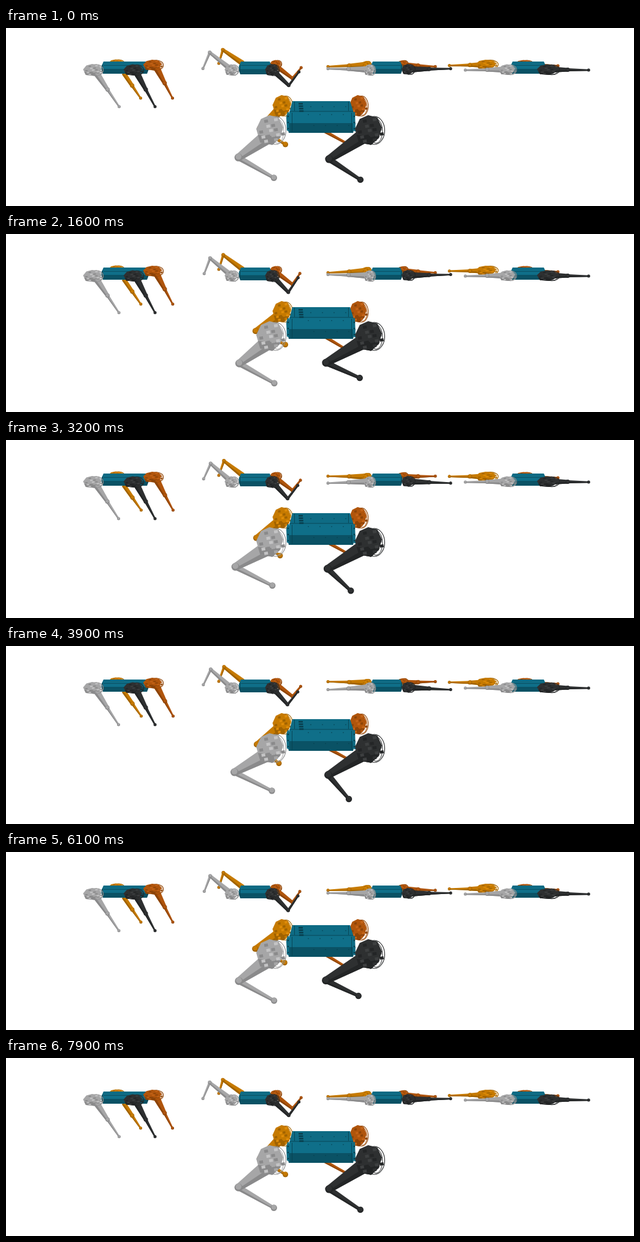
These frames come from a looping animation (1024 px wide and 292 px high, 8000 ms). An HTML page with a canvas:

```html
<!DOCTYPE html>
<html lang="en">
<head>
<meta charset="utf-8">
<title>Walking robots</title>
<style>
html, body { margin: 0; width: 100%; height: 100%; overflow: hidden; background: #fff; }
canvas { display: block; }
</style>
</head>
<body>
<canvas id="stage" width="1024" height="292"></canvas>
<script>
const ctx = document.getElementById('stage').getContext('2d');
const LOOP = 8000, STEP = 100, STRIDE = 4500;

// [shade, base, light]
const grey = ['#8a8a8b', '#a6a6a7', '#c4c4c5'];
const black = ['#232526', '#2e3031', '#3d3f40'];
const amber = ['#a06200', '#c67a00', '#e08c08'];
const rust = ['#8c4408', '#b0550c', '#c46418'];
const teal = { top: '#0e6b84', bright: '#0f6f89', low: '#0a5265', dark: '#083f4e' };

// All joints follow two waves: the quick stride and the slow sway
let stride = 0, sway = 0;
const moved = (x, y, [sx, sy], [wx, wy]) =>
  [x + sx * stride + wx * sway, y + sy * stride + wy * sway];

function polygon(color, ...points) {
  ctx.fillStyle = color;
  ctx.beginPath();
  for (const p of points) ctx.lineTo(...p);
  ctx.fill();
}

function disc(color, x, y, r) {
  ctx.fillStyle = color;
  ctx.beginPath();
  ctx.arc(x, y, r, 0, 7);
  ctx.fill();
}

function wire(color, width, x, y, rx, ry) {
  ctx.strokeStyle = color;
  ctx.lineWidth = width;
  ctx.beginPath();
  ctx.ellipse(x, y, rx, ry, 0, 0, 7);
  ctx.stroke();
}

// Tapered bar, darker along its lower edge
function bar(a, b, wa, wb, [shade, base]) {
  const dx = b[0] - a[0], dy = b[1] - a[1], length = Math.hypot(dx, dy);
  const flip = dx < 0 ? -1 : 1;
  const nx = -dy / length * flip, ny = dx / length * flip;
  const side = (p, w, k) => [p[0] + nx * w * k, p[1] + ny * w * k];
  const strip = (color, from, to) => polygon(color,
    side(a, wa, from), side(b, wb, from), side(b, wb, to), side(a, wa, to));
  strip(base, -.5, .5);
  strip(shade, .15, .5);
}

function ball([x, y], r, [shade, base]) {
  disc(shade, x, y, r);
  disc(base, x, y - r * .2, r * .75);
}

function bentLeg(hip, knee, end, [top, joint, ankle, tip], tone) {
  bar(knee, end, joint * .8, ankle, tone);
  ball(end, tip, tone);
  bar(hip, knee, top, joint, tone);
  ball(knee, joint / 2 + .5, tone);
}

function straightLeg(hip, end, tone, width = 11) {
  const knee = [0, 1].map(i => hip[i] + (end[i] - hip[i]) * .5);
  bentLeg(hip, knee, end, [width, 6, 2.4, 2.5], tone);
}

// Faceted motor housing in an open wire cage, covered with small plates
function motor(x, y, rx, ry, tone) {
  const [shade, base, light] = tone;
  const at = (u, v) => [x + u * rx, y + v * ry];
  wire(shade, 1.1, x + rx * .3, y, rx * .68, ry * .92);
  wire(base, 1, x + rx * .42, y + ry * .04, rx * .42, ry * .8);
  polygon(base, at(-.96, -.1), at(-.65, -.75), at(-.1, -1), at(.5, -.85),
    at(.8, -.2), at(.6, .5), at(.1, .95), at(-.7, .8));
  polygon(shade, at(-.85, .3), at(.65, .4), at(.1, .95), at(-.7, .8));
  for (let row = -2; row <= 2; row++) {
    for (let col = -2; col <= 2; col++) {
      const u = col * .32 + (row & 1) * .14, v = row * .33 - col * .05;
      if (Math.hypot(u, v) > .82) continue;
      polygon([light, shade, base][(row * 2 + col * 4 + 12) % 3],
        at(u - .13, v - .07), at(u + .11, v - .11), at(u + .14, v + .08), at(u - .1, v + .12));
    }
  }
}

function smallBody(left, right, top, bottom) {
  const at = k => top + (bottom - top) * k;
  const face = (color, from, to, insetA, insetB) => polygon(color,
    [left + insetA, at(from)], [right - insetA, at(from)], [right - insetB, at(to)], [left + insetB, at(to)]);
  face(teal.top, 0, .34, 4, 1);
  face(teal.bright, .3, .62, 1, 0);
  face(teal.low, .6, 1, 0, 3);
  ctx.fillStyle = teal.dark;
  for (const x of [left + 2, right - 3]) ctx.fillRect(x, at(.25), 1, (bottom - top) * .6);
  ctx.fillRect(left + 4, at(.3), right - left - 8, .6);
}

function standingRobot() {
  straightLeg([192, 74], [220 - sway * .5, 115], amber, 7);
  motor(180, 57, 13, 5.5, amber);
  smallBody(155, 233, 55, 75);
  straightLeg([246, 66], [272 - sway * .5, 115], rust);
  motor(240, 61, 17, 9, rust);
  straightLeg([147, 73], [184 + sway * .5, 129], grey);
  motor(142, 69, 17, 10, grey);
  straightLeg([213, 73], [243, 129], black);
  motor(208, 69, 17, 9.5, black);
}

function crouchingRobot() {
  const widths = [9, 5, 2.6, 2.5];
  bentLeg([386, 58], moved(354.5, 34.5, [0, -.5], [-1, .8]), [347, 58], widths, amber);
  bentLeg([436, 59], [467, 82.5], moved(480, 65.3, [-1, -.4], [.5, -.5]), widths, rust);
  motor(440, 59, 10, 6.5, rust);
  smallBody(379, 434, 55, 76);
  bentLeg([366, 67], moved(333, 39.2, [0, 0], [-.8, .9]),
    moved(322.3, 64.8, [1, -.3], [-.5, 1.5]), widths, grey);
  motor(368, 69, 12, 9.5, grey);
  bentLeg([436, 70], moved(460, 95.4, [0, .4], [1, -1]),
    moved(476.4, 73, [-.4, -.8], [1, -1.5]), widths, black);
  motor(434, 69, 12, 10, black);
}

function flatRobot() {
  const dip = 3.3 - 2.3 * sway - stride;
  straightLeg([594, 60], [525, 65 - dip], amber);
  straightLeg([644, 60], [700, 65 - dip], rust, 9);
  motor(588, 60, 8, 6, amber);
  motor(647, 58, 9, 5, rust);
  smallBody(594, 647, 55, 75);
  straightLeg([592, 68], [525, 65 + dip], grey);
  motor(593, 69, 10, 9.5, grey);
  straightLeg([655, 68], [725, 65 + dip], black);
  motor(656, 68, 11.5, 9, black);
}

function stretchedRobot() {
  straightLeg([846, 60], [900, 62], rust, 9);
  motor(845, 58, 15, 5.5, rust);
  straightLeg([790, 60], [723, 60.5 + sway], amber);
  motor(784, 60, 19, 8, amber);
  smallBody(822, 881, 55, 75);
  straightLeg([820, 68], [749, 69], grey);
  motor(818, 68.5, 15, 9, grey);
  straightLeg([882, 68], [950, 69], black);
  motor(884, 68.5, 19, 9, black);
}

function largeBody() {
  polygon(teal.top, [467, 120], [561, 120], [567, 139], [462, 139]);
  polygon(teal.bright, [462, 137], [566, 137], [569, 157], [458, 157]);
  polygon(teal.low, [458, 156], [570, 156], [566, 172], [461, 172]);
  for (const x of [458, 566]) {
    polygon(teal.top, [x + 1, 138], [x + 3, 138], [x + 4, 170], [x, 168], [x - 1, 146]);
    for (let y = 145; y < 168; y += 10) disc(teal.dark, x + 2, y, 1.3);
  }
  ctx.fillStyle = teal.dark;
  ctx.fillRect(463, 136.5, 103, .8);
  for (const x of [470, 558]) ctx.fillRect(x, 121, .8, 15);
  for (const x of [466, 563]) ctx.fillRect(x, 139, .8, 31);
  for (let y = 123; y < 136; y += 4) ctx.fillRect(477 + (y - 123) * .1, y, 7, 2.6);
  for (let x = 493; x < 555; x += 19) {
    disc(teal.dark, x + 4, 129, .8);
    disc(teal.dark, x, 142, .8);
    disc(teal.dark, x + 9, 160, .8);
  }
}

function largeRobot() {
  const rear = [18, 9, 4, 4.5], front = [26, 12, 5, 5.2];
  bar([514 - sway * 4, 164], moved(552.5, 186, [-2, 0], [-1.5, 1.5]), 6, 4, rust);
  motor(575, 128, 16, 18, rust);
  bentLeg([450, 131], moved(409, 161, [-3, -2.5], [3, 2]),
    moved(452, 187, [2, -5.5], [5, 0]), rear, amber);
  motor(451, 128, 17, 18, amber);
  largeBody();
  bentLeg([432, 174], moved(377.5, 210.5, [2, 1], [3, 2.5]),
    moved(436, 242.5, [1, 1], [1.5, 4]), front, grey);
  motor(432, 168, 25, 25, grey);
  bentLeg([590, 172], moved(524, 212, [-2.5, -1.5], [1, 2]),
    moved(571, 243.5, [3, -7.5], [9, 0]), front, black);
  motor(593, 168, 25, 25, black);
}

function draw(time) {
  const now = Math.floor((time % LOOP) / STEP) * STEP;
  stride = Math.cos(2 * Math.PI * (now - 1700) / STRIDE);
  sway = Math.cos(2 * Math.PI * now / LOOP);
  ctx.fillStyle = '#fff';
  ctx.fillRect(0, 0, 1024, 292);
  standingRobot();
  crouchingRobot();
  flatRobot();
  stretchedRobot();
  largeRobot();
}

const start = performance.now();
function loop() {
  draw(performance.now() - start);
  requestAnimationFrame(loop);
}
loop();
</script>
</body>
</html>
```
